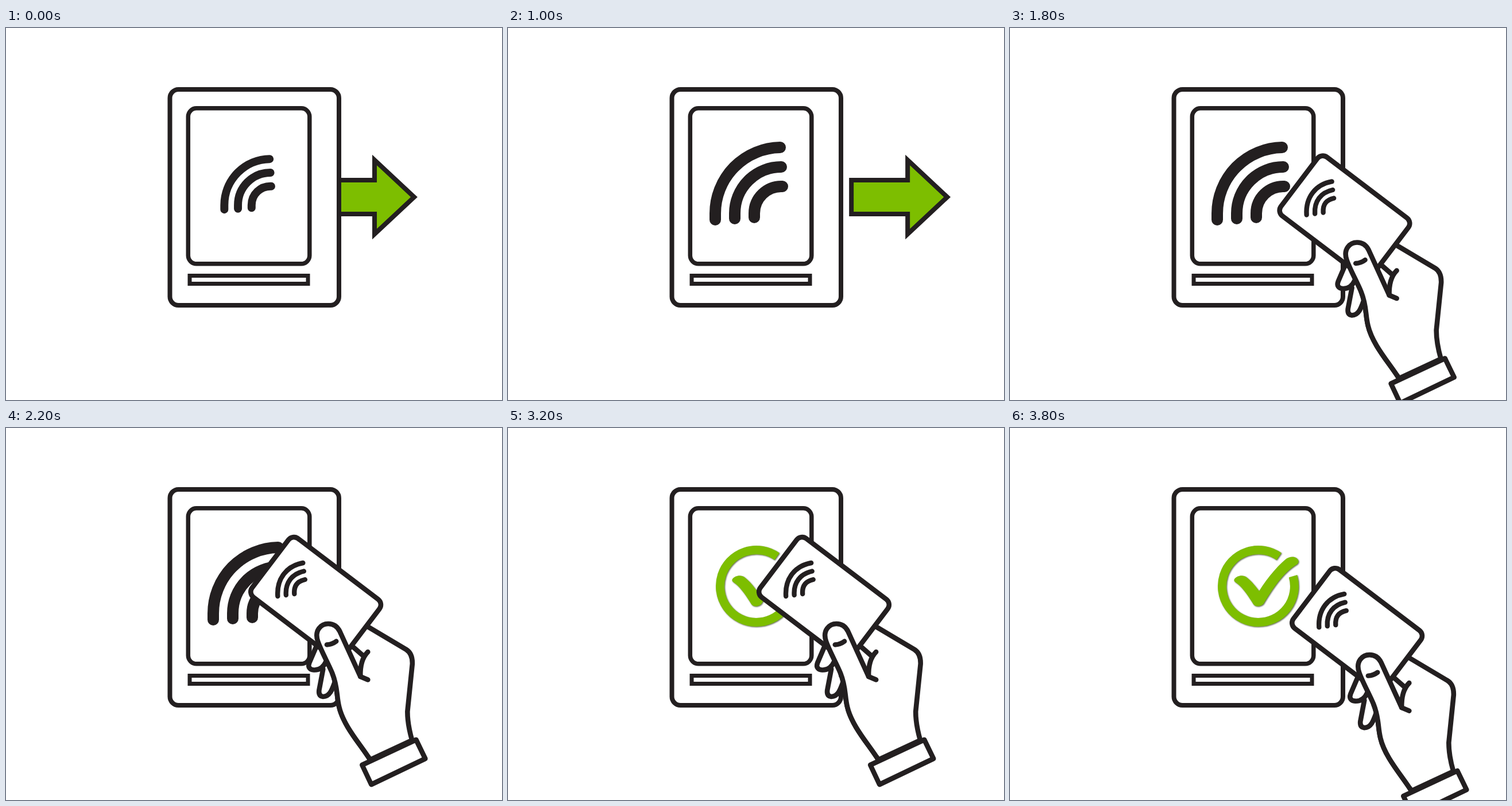
Write an HTML page that moves like this. It is 864 px wide and 648 px high and loops after 3.9 s.

```html
<!DOCTYPE html>
<html lang="en">
<head>
<meta charset="utf-8">
<title>Contactless card reader</title>
<style>
  html, body { margin: 0; width: 100%; height: 100%; overflow: hidden; background: #fff; }
  svg { display: block; width: 864px; height: 648px; }
  .ink { fill: #fff; stroke: #231f20; stroke-width: 8; }
  .line { fill: none; stroke: #231f20; stroke-linecap: round; }
  .round { stroke-linecap: round; stroke-linejoin: round; stroke-width: 8.6; }
  #done { filter: drop-shadow(1.5px 1.5px 0.8px rgba(20, 30, 0, .7)); }
</style>
</head>
<body>
<svg viewBox="0 0 864 648">
  <path id="arrow" class="ink" style="fill:#7dbe00"
    d="M544 265H642V230L711 294.5L642 359V324H544Z"/>

  <rect class="ink" x="285.5" y="107" width="294.5" height="376" rx="15"/>
  <rect class="ink" x="317.3" y="139.8" width="211.5" height="271" rx="14.5" style="stroke-width:7.5"/>
  <rect class="ink" x="320" y="431.5" width="206" height="14" style="stroke-width:7"/>

  <g id="waves" class="line" stroke-width="20">
    <path d="M361 334V323A115 115 0 0 1 474 208"/>
    <path d="M395 332V323A81 81 0 0 1 476 242"/>
    <path d="M429 330V323A47 47 0 0 1 478 276"/>
  </g>

  <g id="done">
    <path id="ring" fill="none" stroke="#7dbe00" stroke-width="15"/>
    <path fill="#7dbe00" d="M391 263C395 257 406 255 412 260C421 267 427 275 434 284
      C447 263 466 240 481 228C488 223 498 223 502 230C504 235 500 238 496 240
      C476 253 458 279 443 304C440 311 428 313 424 307C416 294 407 280 396 271C392 268 389 267 391 263Z"/>
  </g>

  <g id="hand">
    <g class="ink round">
      <path d="M509 420L502 457Q501 467 509 468C521 468 525 455 530 441"/>
      <path d="M497 381L485 409C482 417 486 421 493 421.500C503 422 510 416 514 407"/>
      <path d="M575 339L654 386Q665 393 664.500 411L656 494Q656 516 664 544L591 578
        C575 552 545 520 537 486C532 466 535 452 525 427Z"/>
      <rect width="199" height="128.5" rx="12" transform="translate(455.9 185.3) rotate(37.2)"/>
      <path d="M562 382L578 396" fill="none"/>
      <path d="M591 578C575 552 545 520 537 486C532 466 535 452 525 427C518 410 506 389 500 372
        C493 352 506 341 518 341C528 341 534 346 538 354L574 433L587 438.500"/>
      <path d="M587 390Q573 404 574 433" fill="none"/>
      <path d="M577 587L671 543L687 576L593 621Z"/>
    </g>
    <g class="line" stroke-width="8.400">
      <path d="M515.500 377.500Q525 377 532 371.500"/>
      <path d="M430 293C428 262 446 240 474 235"/>
      <path d="M444.500 291C443 269 455 254 475.500 249.500"/>
      <path d="M459 289C458 275 464 267 477.500 264"/>
    </g>
  </g>
</svg>
<script>
  const $ = id => document.getElementById(id);
  const LOOP = 3900, TICK = 100, STRIDE = 10.83;

  const onRing = deg => {
    const a = deg * Math.PI / 180;
    return `${432.5 + 63 * Math.cos(a)} ${275.5 + 63 * Math.sin(a)}`;
  };
  $('ring').setAttribute('d', `M${onRing(-16)}A63 63 0 1 1 ${onRing(-55)}`);

  const show = (id, on) => $(id).setAttribute('visibility', on ? 'visible' : 'hidden');
  const move = (id, x, y) => $(id).setAttribute('transform', `translate(${x * STRIDE} ${y * STRIDE})`);

  // Distances are counted in strides, one per tick.
  const handX = k => k <= 26 ? 26 - k : k <= 32 ? k - 27 : Math.max(5, k - 28);
  const handY = k => Math.max(0, 21 - k, k - 33);

  function draw(k) {
    show('arrow', k < 16);
    show('hand', k >= 16);
    show('waves', k < 27);
    show('done', k >= 27);

    move('arrow', Math.min(k, 7, 15 - k), 0);
    move('hand', handX(k), handY(k));

    const s = 0.698 + 0.302 * Math.min(k / 7, 1);
    $('waves').setAttribute('transform', `translate(425 275) scale(${s}) translate(-425 -275)`);
  }

  const start = performance.now();
  function frame() {
    draw(Math.floor((performance.now() - start) % LOOP / TICK));
    requestAnimationFrame(frame);
  }
  frame();
</script>
</body>
</html>
```
